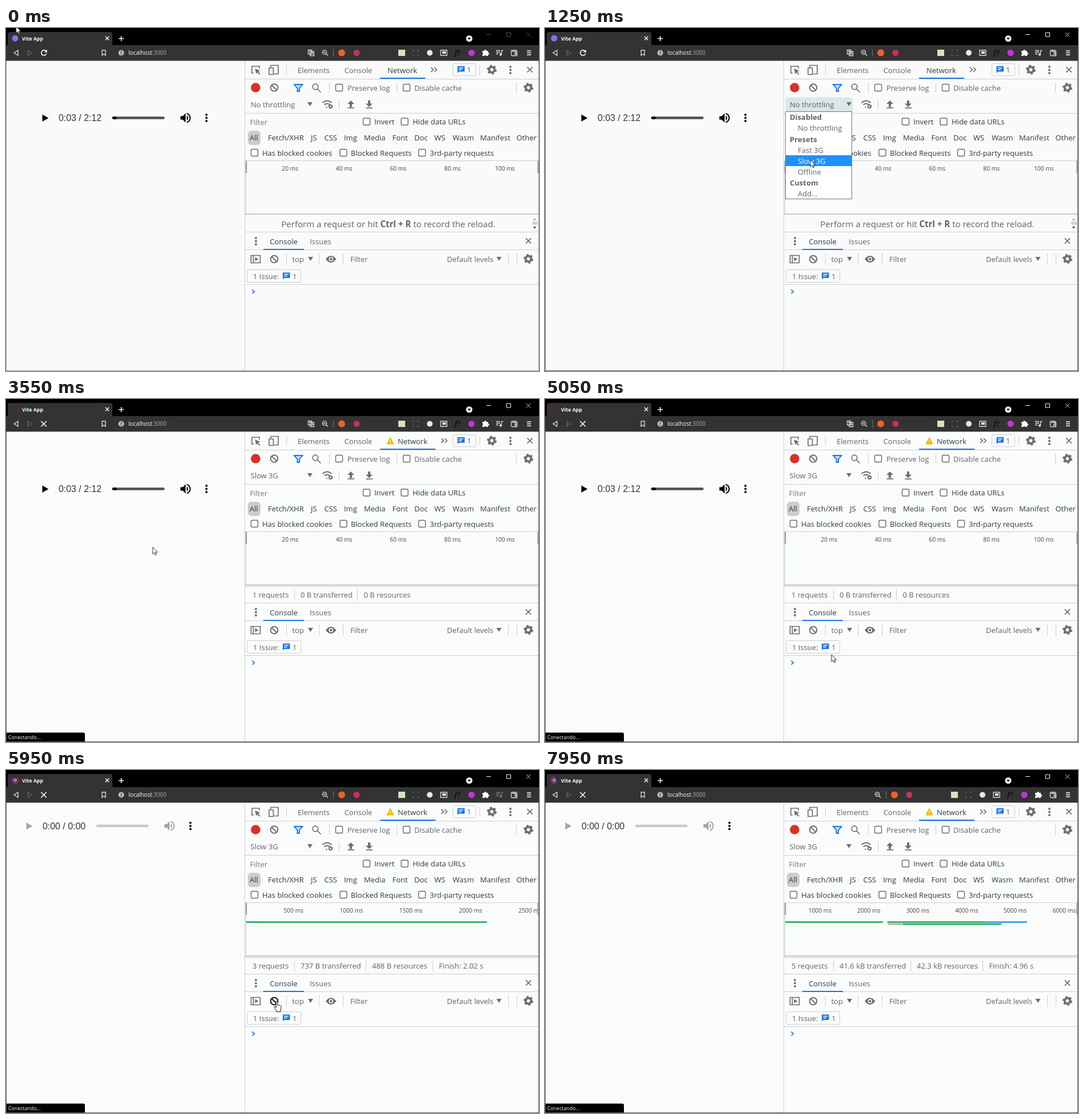
An HTML page for the animation above (8000 ms loop, 932 px wide and 601 px high).

```html
<!DOCTYPE html>
<html lang="en">
<head>
<meta charset="utf-8">
<title>Throttled reload</title>
<style>
@property --t { syntax: "<number>"; inherits: true; initial-value: 0; }
@property --a { syntax: "<number>"; inherits: false; initial-value: 0; }
@property --b { syntax: "<number>"; inherits: false; initial-value: 9000; }

html, body { margin: 0; width: 100%; height: 100%; overflow: hidden; background: #000; }
svg.stage {
  display: block; width: 932px; height: 601px;
  font: 13px "Open Sans", "Noto Sans", sans-serif;
  animation: clock 8s linear infinite;
}
@keyframes clock { from { --t: 0 } to { --t: 8000 } }

/* visible from --a up to --b, in ms */
.span { opacity: clamp(0, min(var(--t) - var(--a) + 1, var(--b) - var(--t)), 1); }

.tools text { fill: #5f6368; }
.tools .ink text, .tools text.ink { fill: #303942; }
.tools .small text { font-size: 10.2px; fill: #444; text-anchor: end; }
.tools .big { font-size: 15.05px; text-anchor: middle; }
.tools .mid { text-anchor: middle; }
.tools .white { fill: #fff; }
.rule { stroke: #cbcdd1; fill: none; }
.line { fill: none; stroke: #6e6e6e; stroke-width: 1.7; }
.pale { fill: none; stroke: #ddd; stroke-width: 1.3; }
.time { font: 15.9px "Liberation Sans", Arial, sans-serif; fill: #333; }
.bold { font-weight: 700; }

.shift { transform: translateX(calc(clamp(0, var(--t) - 7649, 1) * 24px)); }
.wait { transform: translate(16px, 18px) rotate(calc(var(--t) * -.36deg + 18deg)); }
.load { transform: translate(16px, 18px) rotate(calc(var(--t) * .4deg)); }

.cursor { animation: move 8s ease-in-out infinite; }
@keyframes move {
  0%, .625% { transform: translate(17.5px, -3px) }
  8.125%, 9.375% { transform: translate(484px, 139px) }
  10%, 11.1% { transform: translate(484px, 197px) }
  11.875%, 14.3% { transform: translate(478px, 227px) }
  15.625%, 20.6% { transform: translate(464px, 231px) }
  25%, 52.5% { transform: translate(256.500px, 259.500px) }
  60% { transform: translate(499px, 463px) }
  63.125%, 67.5% { transform: translate(501px, 448px) }
  72.5%, 77.5% { transform: translate(474px, 405px) }
  86.25% { transform: translate(655px, 432px) }
  88.75%, 89.5% { transform: translate(658px, 434px) }
  92%, 100% { transform: translate(944px, 300px) }
}
</style>
</head>
<body>
<svg class="stage" viewBox="0 0 932 601">
<defs>
  <g id="gear" fill="none" stroke="#6e6e6e">
    <circle r="4.8" stroke-width="3.8"/>
    <circle r="7.200" stroke-width="2.700" stroke-dasharray="3.700 3.840"/>
  </g>
  <rect id="box" x="-6" y="-6" width="12" height="12" rx="2" fill="#fff" stroke="#6a6a6a" stroke-width="1.4"/>
  <g id="dots"><circle cy="-5.5" r="2"/><circle r="2"/><circle cy="5.5" r="2"/></g>
  <path id="caret" d="M-4.5-3.5h9L0 3.5z" fill="#6e6e6e"/>
  <path id="cross" d="M-4.7-4.7l9.4 9.4M4.7-4.7l-9.4 9.4"/>
  <g id="ban" fill="none" stroke="currentColor" stroke-width="2"><circle r="6.3"/><path d="M-4.5-4.5l9 9"/></g>
  <path id="more" class="line" d="M-5-4l4.2 4-4.2 4M1-4l4.2 4L1 4"/>
  <g id="issue">
    <path d="M-6-6H6.500v9.500H-3.500L-6 6z" fill="#1a73e8"/>
    <path d="M-3.500-3h7.500M-3.500 0h5" stroke="#fff" stroke-width="1.3"/>
  </g>
  <path id="arrow" d="M0 0V12.200L2.800 9.600 4.700 13.900 6.700 13 4.800 8.900H8.600z" fill="#fff" stroke="#111" stroke-width=".9"/>
  <path id="hand" d="M-1.700 1.200c0-1.800 2.700-1.800 2.700 0V7l5 1.100c1 .3 1.400 1 1.200 2L6 16.500v2H-1v-2l-4-5.500c-.8-1.300.8-2.200 1.800-1.200l1.500 1.500z" fill="#fff" stroke="#111"/>
  <g id="player">
    <path d="M63.500 151.500v12.500l10.800-6.250z" fill="currentColor"/>
    <path d="M188 157.500h87" stroke="var(--track)" stroke-width="4.600" stroke-linecap="round"/>
    <path transform="translate(302 145.500)" fill="currentColor" d="M3 9v6h4l5 5V4L7 9H3zm13.500 3c0-1.770-1.020-3.290-2.500-4.030v8.050c1.480-.730 2.500-2.250 2.500-4.020zM14 3.230v2.060c2.890.860 5 3.540 5 6.710s-2.110 5.850-5 6.710v2.060c4.010-.910 7-4.490 7-8.770s-2.990-7.860-7-8.770z"/>
    <use href="#dots" x="350.500" y="157.500"/>
  </g>
</defs>

<!-- window -->
<rect width="932" height="601"/>
<path d="M3 30V11q0-4 4-4H182q4 0 4 4V30H932V58H0V30z" fill="#333"/>
<rect x="1" y="57.500" width="930" height="542.500" fill="#fafafa"/>
<rect class="span" style="--a:3150" x="1" y="57.500" width="930" height="542.500" fill="#fafcfc"/>
<path class="span" style="--b:700" d="M.5 58V600.500H931.500V58" fill="none" stroke="#92948c"/>
<path class="span" style="--a:700" d="M.5 58V600.500H931.500V58" fill="none" stroke="#565853"/>

<!-- tab strip -->
<circle class="span" style="--b:3150" cx="16" cy="18" r="5.500" fill="#8b6cf0"/>
<g class="span" style="--a:3150;--b:5300"><path class="wait" d="M-3.500 5.200A6.200 6.200 0 0 1-3.500-5.200" fill="none" stroke="#8f1d1d" stroke-width="1.400"/></g>
<g class="span" style="--a:5300">
  <circle cx="16" cy="18" r="3.400" fill="#8b6cf0"/>
  <path class="load" d="M0 5.500A5.500 5.500 0 1 1 5.500 0" fill="none" stroke="#b8362a" stroke-width="1.400"/>
</g>
<text class="bold" x="28" y="21.500" font-size="8.800" fill="#fff">Vite App</text>
<use href="#cross" transform="translate(177 18) scale(.68)" stroke="#fff" stroke-width="1.900"/>
<path d="M197 18.500h9M201.500 14v9" stroke="#fff" stroke-width="1.500"/>
<circle cx="810" cy="18.500" r="5.500" fill="#fff"/><path d="M807 17h6l-3 3.700z"/>
<g fill="none">
  <g class="span" style="--b:700" stroke="#555"><path d="M840 11.500h8M875.500 8h7v7h-7z"/><use href="#cross" transform="translate(913.500 11.500) scale(.8)"/></g>
  <g class="span" style="--a:700" stroke="#fff"><path d="M840 11.500h8M875.500 8h7v7h-7z"/><use href="#cross" transform="translate(913.500 11.500) scale(.8)"/></g>
</g>

<!-- address bar -->
<path class="pale" d="M21 39v9l-7-4.500z"/>
<path d="M38.500 39v9l7-4.500z" fill="none" stroke="#777"/>
<g fill="none" stroke="#fff" stroke-width="1.600">
  <path class="span" style="--b:3150" d="M70 40.500A4.600 4.600 0 1 0 70.800 45M71 38.500v3.500h-3.500"/>
  <use class="span" style="--a:3150" href="#cross" x="66" y="43.500"/>
</g>
<path class="pale" d="M168 39h6v9l-3-2.500-3 2.500z"/>
<circle cx="201.500" cy="43.500" r="5" fill="#bbb"/><path d="M201.500 40.500v3.700M201.500 45.200v1.500" stroke="#333" stroke-width="1.400"/>
<text x="214" y="47" font-size="9.900" fill="#fff">localhost<tspan fill="#aaa">:3000</tspan></text>
<g class="span" style="--b:5300"><path class="pale" d="M528.500 38.500h6v7h-6zM532 41h6.500v7.500H532zM530 41h3M534 46l1.500-3 1.500 3"/></g>
<g class="shift">
  <circle class="pale" cx="557" cy="42.500" r="3.700"/><path class="pale" d="M560 45.500l3 3M555 42.500h4"/>
  <path d="M572.500 37v13" stroke="#777"/>
  <circle cx="587" cy="43.500" r="6" fill="#f2602c"/>
  <circle cx="613" cy="43.500" r="5.500" fill="#c72f5c"/>
  <rect x="686" y="38" width="12" height="11" fill="#d3e5b8"/>
  <path d="M711.500 41v-2.500h3M718.500 38.500h3V41M721.500 46v2.500h-3M714.500 48.500h-3V46" fill="none" stroke="#2d8a45"/>
  <circle cx="741" cy="43.500" r="5" fill="#e8e8e8"/>
  <path class="pale" d="M760 39h11v9h-11z"/><path d="M763 41h6v4h-6z" fill="#fff"/>
  <text x="784.500" y="47.500" font-size="12" font-style="italic" font-family="Noto Serif, serif">f?</text>
  <circle cx="814" cy="43.500" r="5.500" fill="#c533d8"/>
  <path d="M833 40h3.500a1.700 1.700 0 1 1 3.300 0H843v3.200a1.700 1.700 0 1 1 0 3.300V49h-3.200a1.700 1.700 0 0 0-3.300 0H833v-3a1.700 1.700 0 0 0 0-3.200z" fill="#fff"/>
</g>
<g class="span" style="--b:7650">
  <g class="pale"><path d="M857 39.500h7M857 42.500h7M857 45.500h4M866.500 39v7M866.500 39.500h3"/><circle cx="865" cy="46.500" r="1.500" fill="#ddd"/></g>
  <rect class="span" style="--a:5300" x="855" y="36" width="16" height="15" fill="#333" fill-opacity=".6"/>
</g>
<path class="pale" d="M883.500 40.500q0-1.500 1.500-1.500h7v2M883.500 40.500V47q0 1.500 1.500 1.500h8.500V41H885M894 43.500h-4v2.500h4"/>
<path d="M911 40h7M911 43.500h7M911 47h7" stroke="#fff" stroke-width="1.400"/>

<!-- page -->
<g class="span" style="--b:5300;--track:#505050">
  <use href="#player"/><path d="M188 157.500h3.500" stroke="#000" stroke-width="4.600" stroke-linecap="round"/>
  <text class="time" x="92" y="163">0:03 / 2:12</text>
</g>
<g class="span" style="--a:5300;--track:#c8c9cb">
  <g transform="translate(-28 -59.500)">
    <use href="#player" color="#a5a6a7"/><text class="time" x="92" y="163">0:00 / 0:00</text>
  </g>
</g>

<g class="tools">
  <path class="rule" d="M417.500 58V600M418 89.500H931M418 149.500H931M418 232.500H931M418 357.500H931M418 388.500H931M418 449.500H931"/>

  <!-- panel tabs -->
  <path class="line" d="M433 79h-3V67h13v4" stroke-width="1.500"/><path d="M435.500 71l9 4-3.500 1.500 3.500 4-1.500 1.300-3.600-4-2 3z" fill="#6e6e6e"/>
  <path class="line" d="M463 69v-3.500h13v15h-7M460 70h7.500v11.500H460z"/>
  <path class="rule" d="M490.500 65v17M828.500 65v17M565.500 96v17M683.500 96v17M892.500 96v17M582.500 126v17"/>
  <text class="mid" x="538" y="78.500">Elements</text><text class="mid" x="616" y="78.500">Console</text>
  <g class="span ink" style="--b:1650">
    <text x="667" y="78.500">Network</text><use href="#more" x="748" y="73"/>
    <path d="M654 88h79" stroke="#1a73e8" stroke-width="2"/>
  </g>
  <g class="span ink" style="--a:1650">
    <path d="M672 67.500l6 11.500h-12z" fill="#f4b400" stroke="#f4b400" stroke-linejoin="round"/>
    <path d="M672 71.500v3.500M672 76.200v1.500" stroke="#fff" stroke-width="1.500"/>
    <text x="685" y="78.500">Network</text><use href="#more" x="766" y="73"/>
    <path d="M654 88h97" stroke="#1a73e8" stroke-width="2"/>
  </g>
  <rect class="rule" x="781.500" y="62.500" width="40" height="21" rx="2"/>
  <use href="#issue" x="795.500" y="73"/><text x="806" y="78">1</text>
  <use href="#gear" x="849.500" y="73"/><use href="#dots" x="882" y="73.500" fill="#6e6e6e"/>
  <use href="#cross" x="916" y="73" class="line"/>

  <!-- network toolbar -->
  <circle cx="436.500" cy="104.500" r="8.300" fill="#d93025"/>
  <use href="#ban" x="469" y="104.500" color="#6e6e6e"/>
  <path d="M504 99h14.500l-5.500 6.500v5.500h-3.500v-5.500z" fill="#c9dffb" stroke="#1a73e8" stroke-width="1.900"/>
  <circle class="line" cx="541" cy="103" r="4.800"/><path class="line" d="M544.500 106.500l6 6"/>
  <use href="#box" x="582.500" y="104.500"/><text x="597" y="109.500">Preserve log</text>
  <use href="#box" x="700.500" y="104.500"/><text x="714" y="109.500">Disable cache</text>
  <use href="#gear" x="913.500" y="104.500"/>
  <rect class="span" style="--a:700;--b:1650" x="421" y="121.500" width="117" height="25" rx="2" fill="#dbe6ea"/>
  <text class="span" style="--b:1650" x="428" y="139">No throttling</text>
  <text class="span" style="--a:1650" x="427.500" y="139">Slow 3G</text>
  <use href="#caret" x="531.500" y="133.500"/>
  <path class="line" d="M553.500 131q8-7 16 0M556.500 134.500q5-4 10 0M559.500 138l2 2" stroke-width="2"/>
  <use href="#gear" transform="translate(567.500 137.500) scale(.48)"/>
  <path d="M603 127l6 6h-4v5.500h-4V133h-4zM597.500 139h11.500v1.800h-11.500zM635 138.500l6-6h-4V127h-4v5.500h-4zM629.500 139.200h11.500v1.800h-11.500z" fill="#6e6e6e"/>

  <!-- filters -->
  <text x="426.500" y="169.500" opacity=".85">Filter</text>
  <rect x="423" y="180" width="22" height="25" rx="6" fill="#cbccce"/>
  <g class="ink">
    <use href="#box" x="630.500" y="164"/><text x="644" y="169">Invert</text>
    <use href="#box" x="697" y="164"/><text x="711" y="169">Hide data URLs</text>
    <text x="426" y="197">All</text><text x="458" y="197">Fetch/XHR</text><text x="533" y="197">JS</text>
    <text x="556.500" y="197">CSS</text><text x="591" y="197">Img</text><text x="626" y="197">Media</text>
    <text x="675.500" y="197">Font</text><text x="714" y="197">Doc</text><text x="749" y="197">WS</text>
    <text x="781" y="197">Wasm</text><text x="829" y="197">Manifest</text><text x="892.500" y="197">Other</text>
    <use href="#box" x="434.500" y="218.500"/><text x="448" y="224">Has blocked cookies</text>
    <use href="#box" x="590" y="218.500"/><text x="603" y="224">Blocked Requests</text>
    <use href="#box" x="727.500" y="218.500"/><text x="741" y="224">3rd-party requests</text>
  </g>

  <!-- timeline -->
  <path d="M419.500 254V325.500" stroke="#c3c8d4"/><path d="M418 326H931" stroke="#b5b7ba" stroke-width="1.600"/>
  <path d="M420 233v21M930.500 233v21" stroke="#9a9a9a" stroke-width="2.500"/>
  <g class="small">
    <g class="span" style="--b:5300">
      <text x="511" y="250">20 ms</text><text x="605.500" y="250">40 ms</text><text x="700" y="250">60 ms</text>
      <text x="795" y="250">80 ms</text><text x="889.500" y="250">100 ms</text>
    </g>
    <svg class="span" style="--a:5300;--b:7650" width="929.500" height="601">
      <text x="520" y="250">500 ms</text><text x="624" y="250">1000 ms</text><text x="728" y="250">1500 ms</text>
      <text x="832.500" y="250">2000 ms</text><text x="936.500" y="250">2500 ms</text>
      <path d="M420 266.500h421" stroke="#1aa650" stroke-width="2.500"/>
    </svg>
    <g class="span" style="--a:7650" stroke-width="2.400">
      <text x="501" y="250">1000 ms</text><text x="586.500" y="250">2000 ms</text><text x="672" y="250">3000 ms</text>
      <text x="757.500" y="250">4000 ms</text><text x="842" y="250">5000 ms</text><text x="928" y="250">6000 ms</text>
      <path d="M420 266.500h171M598.500 266.500h172.500M625.500 270h173" stroke="#1aa650"/>
      <path d="M771 266.500h72" stroke="#2196e3"/><path d="M600 270h24.500" stroke="#a3a3a3"/>
    </g>
  </g>

  <!-- summary -->
  <g class="span" style="--b:3250">
    <text class="big" x="668.500" y="348.500">Perform a request or hit <tspan class="bold">Ctrl + R</tspan> to record the reload.</text>
    <path d="M921.500 337h6l-3-3.500z" fill="#aaa"/><path d="M921.500 348h6l-3 3.500z" fill="#555"/>
    <path d="M920 342h10" stroke="#d0d0d0" stroke-width="5"/>
  </g>
  <g class="span" style="--a:3250;--b:5300">
    <path class="rule" d="M418 328.500H931M504.500 333v20M614.500 333v20"/>
    <text x="431" y="348">1 requests</text><text x="515" y="348">0 B transferred</text><text x="625.500" y="348">0 B resources</text>
  </g>
  <g class="span" style="--a:5300;--b:7650">
    <path class="rule" d="M418 328.500H931M504.500 333v20M629.500 333v20M746.500 333v20"/>
    <text x="431" y="348">3 requests</text><text x="515" y="348">737 B transferred</text>
    <text x="640" y="348">488 B resources</text><text x="757" y="348">Finish: 2.02 s</text>
  </g>
  <g class="span" style="--a:7650">
    <path class="rule" d="M418 328.500H931M504.500 333v20M639.500 333v20M765.500 333v20"/>
    <text x="431" y="348">5 requests</text><text x="515" y="348">41.6 kB transferred</text>
    <text x="650" y="348">42.3 kB resources</text><text x="776.500" y="348">Finish: 4.96 s</text>
  </g>

  <!-- console drawer -->
  <use href="#dots" x="437" y="373.500" fill="#6e6e6e"/>
  <text class="mid ink" x="485.500" y="378.500">Console</text><text class="mid" x="550" y="378.500">Issues</text>
  <path d="M450 388h71" stroke="#1a73e8" stroke-width="2"/>
  <use href="#cross" x="913.500" y="373" class="line"/>
  <path class="line" d="M428.500 398.500h16v13h-16zM432.500 398.500v13" stroke-width="1.500"/><path d="M435.500 401.500v7l6-3.500z" fill="#6e6e6e"/>
  <use href="#ban" x="469" y="405" color="#6e6e6e"/>
  <use class="span" style="--a:5750;--b:6250" href="#ban" x="469" y="405" color="#222"/>
  <path class="rule" d="M490.500 395v20M547.500 395v20M589.500 395v20M878.500 395v20M893.500 395v20"/>
  <text x="500.500" y="410">top</text><use href="#caret" x="532.500" y="404.500"/>
  <path d="M559 405q9-12 18.500 0-9.500 12-18.500 0z" fill="#6e6e6e"/><circle cx="568.300" cy="405" r="3" fill="#6e6e6e" stroke="#fff" stroke-width="1.500"/>
  <text x="602" y="410">Filter</text><text x="771" y="410">Default levels</text>
  <use href="#caret" x="862" y="404.500"/><use href="#gear" x="913.500" y="404.500"/>
  <rect class="rule" x="421.500" y="423.500" width="94" height="22" rx="2"/>
  <text x="432" y="439.500">1 Issue:</text><use href="#issue" x="490" y="434.500"/><text x="501" y="439.500">1</text>
  <path d="M430.500 458.500l4 3.500-4 3.500" fill="none" stroke="#3b82f0" stroke-width="1.800"/>

  <!-- throttling menu -->
  <g class="span" style="--a:700;--b:1650">
    <rect x="420.500" y="146.500" width="116" height="153" fill="#fff" stroke="#757575"/>
    <g class="bold"><text x="428" y="161">Disabled</text><text x="428" y="199.500">Presets</text><text x="428" y="275.500">Custom</text></g>
    <text x="442" y="180">No throttling</text><text x="442" y="218.500">Fast 3G</text>
    <text x="442" y="237.500">Slow 3G</text><text x="442" y="256.500">Offline</text><text x="442" y="294.500">Add...</text>
    <g class="span" style="--b:900"><rect x="421" y="166" width="115" height="19" fill="#1e90ff"/><text class="white" x="442" y="180">No throttling</text></g>
    <g class="span" style="--a:900;--b:950"><rect x="421" y="204" width="115" height="19" fill="#1e90ff"/><text class="white" x="442" y="218.500">Fast 3G</text></g>
    <g class="span" style="--a:950"><rect x="421" y="223" width="115" height="19" fill="#1e90ff"/><text class="white" x="442" y="237.500">Slow 3G</text></g>
  </g>
</g>

<!-- status bubble -->
<g class="span" style="--a:3250">
  <path d="M1 584.500H135q3 0 3 3V600H1z"/>
  <text x="4" y="595.500" font-size="8.800" fill="#fff">Conectando...</text>
</g>

<g class="cursor">
  <use class="span" style="--b:5750" href="#arrow"/>
  <use class="span" style="--a:5750;--b:6250" href="#hand"/>
  <use class="span" style="--a:6250" href="#arrow"/>
</g>
</svg>
</body>
</html>
```
